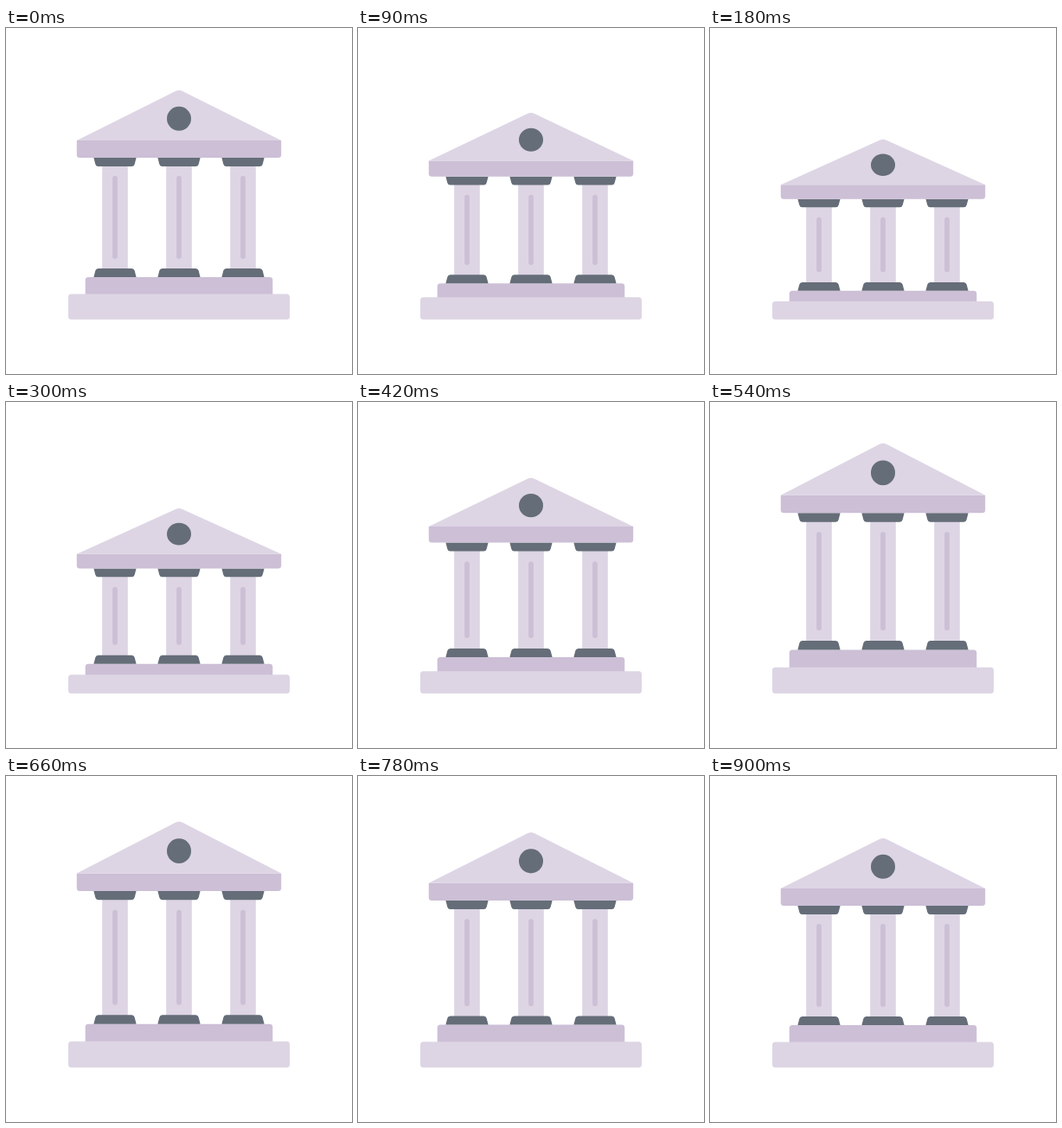
Recreate the animation shown at these times as an HTML page with a canvas. Size 400 by 400 pixels, loop 930 ms.

```html
<!DOCTYPE html>
<html lang="en">
<head>
<meta charset="utf-8">
<style>
  html, body { margin: 0; width: 100%; height: 100%; overflow: hidden; background: #fff; }
  canvas { display: block; }
</style>
</head>
<body>
<canvas id="stage" width="400" height="400"></canvas>
<script>
const ctx = document.getElementById('stage').getContext('2d');
const LIGHT = '#ddd5e4', MID = '#ccbfd6', DARK = '#656d78';
const LOOP = 930, SQUASHED = 195, STRETCHED = 555, SETTLED = 900;

// Heights of each edge at rest, squashed and stretched
const EDGES = {
  apex: [72, 129.7, 47.3],
  eave: [130, 182, 107.4],
  beam: [150, 198.4, 127.9],
  capital: [160, 208, 138.3],
  plinth: [278, 294.2, 275.9],
  step: [288, 304.1, 286.4],
  slab: [307.5, 316.1, 306.6],
  diskY: [104.8, 159.1, 81.4],
  diskR: [14, 12.7, 14.4],
  grooveTop: [171, 219.5, 150],
  grooveEnd: [267, 282.3, 264]
};

// Cubic bezier easing with control points (x1, 0) and (x2, 1)
function ease(x, x1 = 1 / 3, x2 = 2 / 3) {
  let lo = 0, hi = 1, s = 0.5;
  for (let i = 0; i < 20; i++) {
    s = (lo + hi) / 2;
    const r = 1 - s;
    if (3 * r * r * s * x1 + 3 * r * s * s * x2 + s ** 3 < x) lo = s; else hi = s;
  }
  return s * s * (3 - 2 * s);
}

function poseAt(t) {
  let from = 0, to = 1, k;
  if (t < SQUASHED) {
    k = ease(t / SQUASHED);
  } else if (t < STRETCHED) {
    [from, to] = [1, 2];
    k = ease((t - SQUASHED) / (STRETCHED - SQUASHED), 0.66, 0.67);
  } else {
    [from, to] = [2, 0];
    k = ease(Math.min(1, (t - STRETCHED) / (SETTLED - STRETCHED)));
  }
  const pose = {};
  for (const name in EDGES) {
    const e = EDGES[name];
    pose[name] = e[from] + (e[to] - e[from]) * k;
  }
  return pose;
}

function box(color, left, top, right, bottom, radii = 0) {
  ctx.fillStyle = color;
  ctx.beginPath();
  ctx.roundRect(left, top, right - left, bottom - top, radii);
  ctx.fill();
}

// Trapezoid whose narrow side has rounded corners
function foot(x, wide, narrow) {
  ctx.fillStyle = DARK;
  ctx.beginPath();
  ctx.moveTo(x - 24.6, wide);
  ctx.arcTo(x - 22, narrow, x, narrow, 3.5);
  ctx.arcTo(x + 22, narrow, x + 24.6, wide, 3.5);
  ctx.lineTo(x + 24.6, wide);
  ctx.fill();
}

function draw(p) {
  ctx.clearRect(0, 0, 400, 400);

  box(MID, 91.7, p.step, 308.3, p.slab + 1, [3.5, 3.5, 0, 0]);
  box(LIGHT, 72, p.slab, 328, 337, 3.5);

  for (const x of [126, 200, 274]) {
    box(LIGHT, x - 14.8, p.capital - 1, x + 14.8, p.plinth + 1);
    box(MID, x - 2.9, p.grooveTop, x + 2.9, p.grooveEnd, 2.9);
    foot(x, p.beam, p.capital);
    foot(x, p.step, p.plinth);
  }

  box(MID, 81.8, p.eave, 318.2, p.beam, [0, 0, 3.5, 3.5]);
  ctx.fillStyle = LIGHT;
  ctx.beginPath();
  ctx.moveTo(81.8, p.eave);
  ctx.lineTo(196, p.apex + 1);
  ctx.quadraticCurveTo(200, p.apex - 1, 204, p.apex + 1);
  ctx.lineTo(318.2, p.eave);
  ctx.fill();

  ctx.fillStyle = DARK;
  ctx.beginPath();
  ctx.ellipse(200, p.diskY, 14, p.diskR, 0, 0, 2 * Math.PI);
  ctx.fill();
}

const start = performance.now();
function tick() {
  draw(poseAt((performance.now() - start) % LOOP));
  requestAnimationFrame(tick);
}
tick();
</script>
</body>
</html>
```
